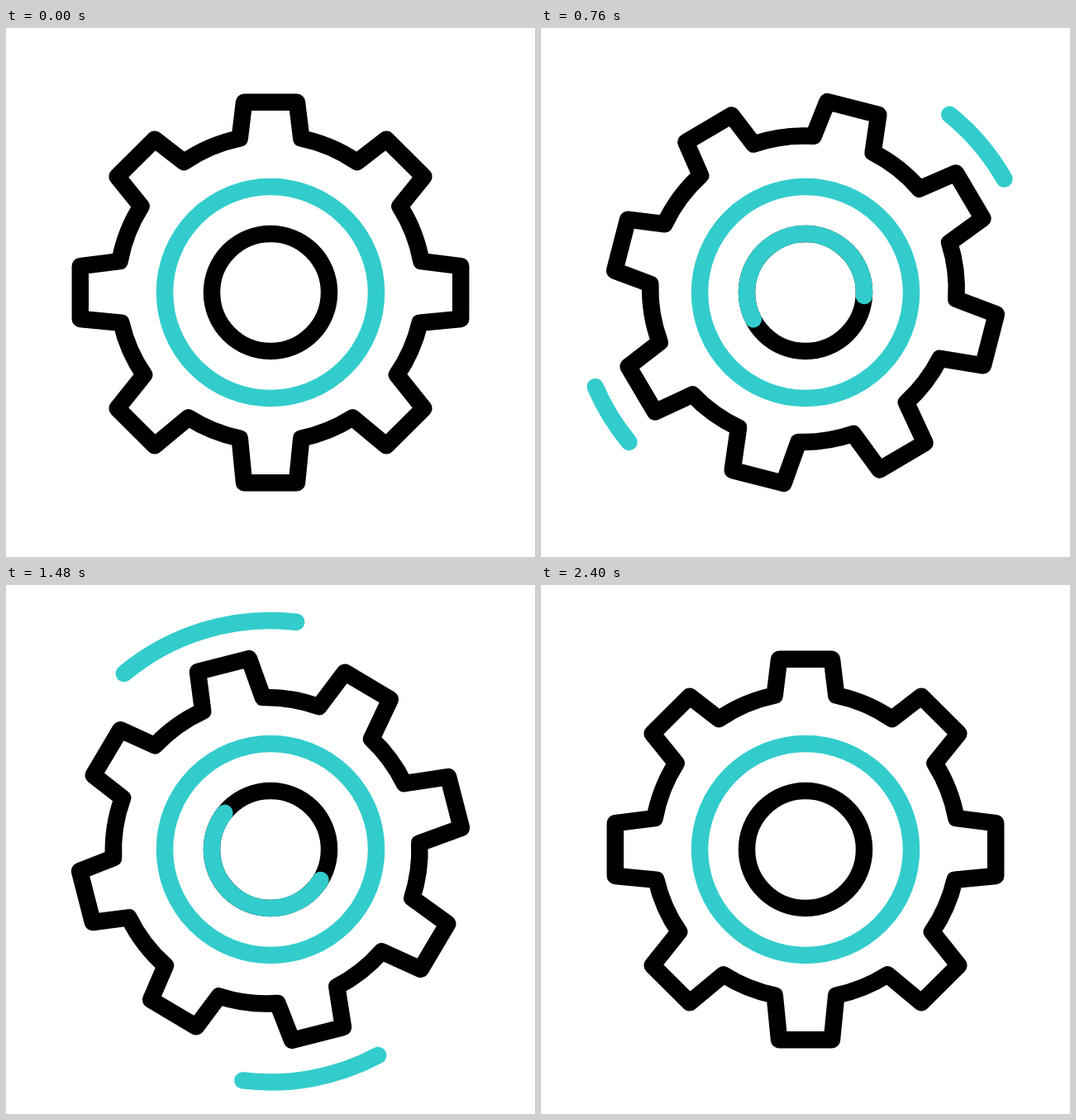
Animation, 640 px wide and 640 px high, one loop 2480 ms. Source, as an HTML page with a canvas:

```html
<!DOCTYPE html>
<html lang="en">
<head>
<meta charset="utf-8">
<title>Turning gear</title>
<style>
  html, body { margin: 0; width: 100%; height: 100%; overflow: hidden; background: #fff; }
  canvas { display: block; width: 100vmin; height: 100vmin; }
</style>
</head>
<body>
<canvas id="stage" width="640" height="640"></canvas>
<script>
const ctx = document.getElementById('stage').getContext('2d');
const LOOP = 2480, STEP = 40, LAST = 2400;
const BLACK = '#000', TEAL = '#33cccc';
const CENTER = 320, LINE = 20.5;

const rad = deg => deg * Math.PI / 180;
const mix = (a, b, u) => a + (b - a) * u;
const progress = (t, from, to) => Math.min(1, Math.max(0, (t - from) / (to - from)));
const smooth = u => u * u * (3 - 2 * u);

// Timing curve that rests at both ends; x1 and x2 are its handle positions.
function bezier(x1, x2, x) {
  let low = 0, high = 1;
  for (let i = 0; i < 24; i++) {
    const s = (low + high) / 2, r = 1 - s;
    if (3 * x1 * s * r * r + 3 * x2 * s * s * r + s * s * s < x) low = s;
    else high = s;
  }
  return smooth(low);
}

// Angles are in degrees, clockwise from twelve o'clock.
function arc(y, radius, start, end, color) {
  ctx.beginPath();
  ctx.arc(CENTER, y, radius, rad(start - 90), rad(end - 90));
  ctx.strokeStyle = color;
  ctx.stroke();
}

const ring = (radius, color) => arc(CENTER, radius, 0, 360, color);

const SWING = 108, TURN = 1320;

function gearAngle(t) {
  const out = bezier(0.86, 0.63, progress(t, 0, TURN));
  const back = bezier(0.515, 0.366, progress(t, TURN, LAST));
  return -SWING * (out - back);
}

const TEETH = 8, TIP_RADIUS = 232.4, TIP_HALF = 7.9;
const ROOT_Y = -5, ROOT_RADIUS = 185.3, ROOT_HALF = 11.6;

function gear(angle) {
  ctx.save();
  ctx.translate(CENTER, CENTER);
  ctx.rotate(rad(angle));
  ctx.beginPath();
  // The root circle sits a little high, so each tooth's foot leans to meet it.
  const foot = tooth => {
    const a = tooth * 360 / TEETH;
    return a + 1.4 * Math.sin(rad(a));
  };
  for (let tooth = 0; tooth < TEETH; tooth++) {
    for (const side of [-1, 1]) {
      const a = rad(tooth * 360 / TEETH + side * TIP_HALF);
      ctx.lineTo(TIP_RADIUS * Math.sin(a), -TIP_RADIUS * Math.cos(a));
    }
    ctx.arc(0, ROOT_Y, ROOT_RADIUS,
      rad(foot(tooth) + ROOT_HALF - 90), rad(foot(tooth + 1) - ROOT_HALF - 90));
  }
  ctx.closePath();
  ctx.strokeStyle = BLACK;
  ctx.stroke();
  ctx.restore();
}

// Each streak grows from one point, swings round and shrinks into another.
const streaks = [
  { y: 320, origin: 103, head: -43, tail: 5.5, exit: 84 },
  { y: 324.5, origin: 294, head: 149, tail: 186, exit: 266 }
];

function drawStreaks(t) {
  if (t < 450 || t > 2050) return;
  const out = smooth(progress(t, 448, 1128));
  const back = progress(t, 1370, 2060);
  for (const { y, origin, head, tail, exit } of streaks) {
    const start = mix(mix(origin, head, out), exit, back ** 2);
    const end = mix(mix(origin, tail, out), exit, back ** 2.4);
    arc(y, 277, start, end, TEAL);
  }
}

const HUB_RADIUS = 71, HUB_COVER = 1640;

function drawHub(t) {
  ring(HUB_RADIUS, BLACK);
  if (t < 330 || t > 2010) return;
  const spin = Math.min(0, Math.max(0.0907 * t - 186, 0.153 * t - 278));
  const start = spin + 360 * smooth(progress(t, 969, 2018));
  const end = spin + 360 * smooth(progress(t, 326, 1106));
  arc(CENTER, HUB_RADIUS, start, end, TEAL);
  if (t > HUB_COVER) arc(CENTER, HUB_RADIUS, start - 20, start, BLACK);
}

function draw(t) {
  ctx.fillStyle = '#fff';
  ctx.fillRect(0, 0, 640, 640);
  ctx.lineWidth = LINE;
  ctx.lineCap = ctx.lineJoin = 'round';
  gear(gearAngle(t));
  ring(128, TEAL);
  drawHub(t);
  drawStreaks(t);
}

const began = performance.now();
function tick() {
  const t = (performance.now() - began) % LOOP;
  draw(Math.min(Math.floor(t / STEP) * STEP, LAST));
  requestAnimationFrame(tick);
}
tick();
</script>
</body>
</html>
```
